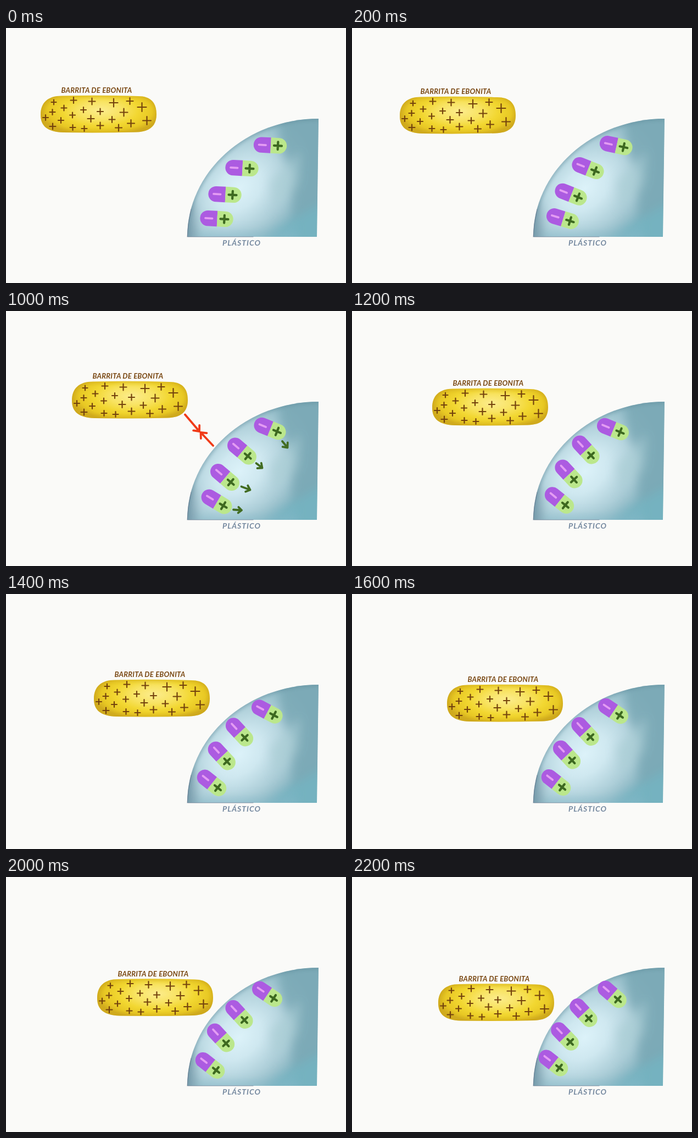
Write an HTML page that moves like this. It is 619 px wide and 464 px high and loops after 2.4 s.

```html
<!DOCTYPE html>
<html lang="es">
<head>
<meta charset="utf-8">
<title>Atracción entre cargas</title>
<style>
  html, body { margin: 0; width: 100%; height: 100%; overflow: hidden; background: #fafaf8; }
  svg { display: block; width: 100vw; height: 100vh; }
  text { font-family: Lato, "Open Sans", sans-serif; font-style: italic; font-weight: 700; text-anchor: middle; }
  .line { fill: none; stroke-linecap: round; stroke-linejoin: round; }
</style>
</head>
<body>
<svg viewBox="0 0 619 464">
  <defs>
    <radialGradient id="gold" gradientUnits="userSpaceOnUse" cx="0" cy="0" r="1" gradientTransform="translate(172 150) scale(112 46)">
      <stop offset="0" stop-color="#fcec8c"/>
      <stop offset=".35" stop-color="#f8e362"/>
      <stop offset=".62" stop-color="#f2d731"/>
      <stop offset=".85" stop-color="#e8c824"/>
      <stop offset="1" stop-color="#d2ad1f"/>
    </radialGradient>
    <radialGradient id="glass" gradientUnits="userSpaceOnUse" cx="0" cy="0" r="1" gradientTransform="translate(424 292) rotate(-42) scale(158 112)">
      <stop offset="0" stop-color="#dcf2f9"/>
      <stop offset=".3" stop-color="#cfe8f0"/>
      <stop offset=".65" stop-color="#aecfd9"/>
      <stop offset="1" stop-color="#84b2bf"/>
    </radialGradient>
    <path id="sector" d="M330 380A239 215 0 0 1 569 165L566 380Z"/>
    <path id="bar" d="M63 158C63 136 76 123 103 123.500Q170 122 240 124C263 124 274 135 274 157C274 178 262 189 237 189.500Q170 191 104 190C76 189 63 179 63 158Z"/>
    <clipPath id="inSector"><use href="#sector"/></clipPath>
    <clipPath id="inBar"><use href="#bar"/></clipPath>
    <filter id="soft" x="-50%" y="-50%" width="200%" height="200%"><feGaussianBlur stdDeviation="9"/></filter>
    <filter id="edge" x="-10%" y="-20%" width="120%" height="140%"><feGaussianBlur stdDeviation="3"/></filter>
    <g id="pill">
      <path fill="#ac5be1" d="M1-14.200H-16A14.200 14.200 0 0 0-16 14.200H1Z"/>
      <path fill="#bbe78c" d="M1-14.200H16A14.200 14.200 0 0 1 16 14.200H1Z"/>
      <path class="line" stroke="#e49cf3" stroke-width="3.800" d="M-20.500 0H-8"/>
      <path class="line" stroke="#3d6920" stroke-width="4.200" d="M7 0H21M14-7V7"/>
    </g>
  </defs>

  <g clip-path="url(#inSector)">
    <use href="#sector" fill="url(#glass)"/>
    <g filter="url(#soft)">
      <path fill="#79a9b5" opacity=".85" d="M500 150H590V400H535Q515 335 525 265Q490 225 500 150Z"/>
      <path fill="#71b5c3" opacity=".65" d="M480 372L580 315V395H470Z"/>
      <path fill="#a9ccd5" opacity=".65" d="M480 280L535 225L530 285L490 330Z"/>
      <path fill="#86b8c6" opacity=".55" d="M355 372H530V395H345Z"/>
      <path fill="#698a9b" opacity=".65" d="M322 395V310L342 318L347 390Z"/>
    </g>
    <path class="line" filter="url(#edge)" stroke="#638e9e" stroke-width="4" opacity=".8" d="M330 380A239 215 0 0 1 569 165"/>
    <path class="line" filter="url(#edge)" stroke="#59849a" stroke-width="4" opacity=".7" d="M330 380H566"/>
  </g>
  <path class="line" stroke="#58647f" stroke-width="1" opacity=".6" d="M331 380H450M330 380Q331 355 337 330"/>
  <text x="429" y="395.500" font-size="14" letter-spacing="1" fill="#74889f">PLÁSTICO</text>

  <g id="pills"></g>
  <path id="push" class="line" stroke="#426c22" stroke-width="3.800"/>

  <g id="rod">
    <use href="#bar" fill="url(#gold)"/>
    <g clip-path="url(#inBar)">
      <use href="#bar" class="line" filter="url(#edge)" stroke="#c9a21f" stroke-width="4" opacity=".75"/>
    </g>
    <path id="charges" class="line" stroke="#74430d" stroke-width="2.200"/>
    <text x="165" y="118" font-size="13" letter-spacing=".25" fill="#784610">BARRITA DE EBONITA</text>
  </g>
  <path id="pull" class="line" stroke="#f03b18" stroke-width="3.800"/>
</svg>
<script>
const STEP = 200, STEPS = 12;
const $ = id => document.getElementById(id);

// x, y, arm length of each plus on the rod
const charges = [
  [87, 135, 4.5], [123, 131.5, 5.5], [156.500, 133.500, 6], [196, 136, 7.5], [225.500, 133, 6],
  [247.500, 144, 8], [105.500, 145.500, 5], [141, 149, 5], [84.500, 153, 5], [121, 158.500, 5],
  [171.500, 152, 5.5], [214.500, 153.500, 7], [72, 163, 5], [100, 168, 5], [154.500, 165, 6],
  [193, 166.500, 5.5], [256.500, 168.500, 7.5], [227.500, 173.500, 6.5], [85, 179, 5.5],
  [121.500, 181, 5], [142.500, 183, 5], [171.500, 177.500, 6], [205, 181.500, 6]
];
$('charges').setAttribute('d', charges.map(([x, y, r]) =>
  `M${x - r} ${y}h${2 * r}M${x} ${y - r}v${2 * r}`).join(''));

// rod offset at each step
const rodPath = [
  [0, 0], [24, 2], [57, 5], [57, 5], [57, 5], [57, 5],
  [83, 18], [97, 33], [110, 42], [110, 53], [103, 62.5], [94, 71.5]
];

// x, y, angle of each pill at its key steps; steps between are interpolated
const keySteps = [0, 2, 5, 6, 8, 10, 11];
const poses = [
  [[481, 213.5, 3], [480.500, 214, 22], [475, 215, 22], [475.500, 213, 34], [473.500, 213.500, 41]],
  [[429.500, 255, 3], [429.500, 255, 40], [425.500, 252.500, 47], [424.500, 250, 47], [421.500, 247, 47]],
  [[398.500, 303, 3], [398.500, 302.500, 40], [394.500, 296.500, 47], [391, 292.500, 47], [387.500, 290, 46]],
  [[383.500, 347, 3], [383.500, 347, 31], [377.500, 344.500, 39], [371.500, 343, 38], [366.500, 338.500, 38]]
].map(([rest, turned, near, close, last]) => [rest, turned, turned, near, close, close, last]);

const pills = poses.map(() => {
  const use = document.createElementNS('http://www.w3.org/2000/svg', 'use');
  use.setAttribute('href', '#pill');
  return $('pills').appendChild(use);
});

const mix = (a, b, k) => a + (b - a) * k;

function poseAt(keys, step) {
  const next = keySteps.findIndex(s => s >= step);
  if (keySteps[next] === step) return keys[next];
  const from = keySteps[next - 1];
  const k = (step - from) / (keySteps[next] - from);
  return keys[next - 1].map((v, i) => mix(v, keys[next][i], k));
}

function arrow(x1, y1, x2, y2, barb) {
  const dir = Math.atan2(y2 - y1, x2 - x1);
  const end = turn => `${x2 - barb * Math.cos(dir + turn)} ${y2 - barb * Math.sin(dir + turn)}`;
  return `M${x1} ${y1}L${x2} ${y2}M${end(0.72)}L${x2} ${y2}L${end(-0.72)}`;
}

$('push').setAttribute('d',
  arrow(503, 237, 512.500, 248.500, 9) + arrow(455.500, 277, 466.500, 285.500, 9) +
  arrow(428.500, 319.500, 444.500, 325.500, 9) + arrow(414, 361.500, 429, 362.500, 8));

function draw(step) {
  $('rod').setAttribute('transform', `translate(${rodPath[step]})`);
  pills.forEach((pill, i) => {
    const [x, y, angle] = poseAt(poses[i], step);
    pill.setAttribute('transform', `translate(${x} ${y}) rotate(${angle})`);
  });
  const active = step >= 2 && step <= 5;
  $('push').style.display = $('pull').style.display = active ? '' : 'none';
  if (active) {
    const k = (step - 2) / 3;
    $('pull').setAttribute('d',
      arrow(326, 188.500, mix(337.500, 352, k), mix(201.500, 219, k), 11) +
      arrow(377, 245, mix(366, 354.500, k), mix(233.500, 221, k), 11));
  }
}

const start = performance.now();
let shown = -1;
function tick() {
  const step = Math.floor((performance.now() - start) / STEP) % STEPS;
  if (step !== shown) draw(shown = step);
  requestAnimationFrame(tick);
}
tick();
</script>
</body>
</html>
```
